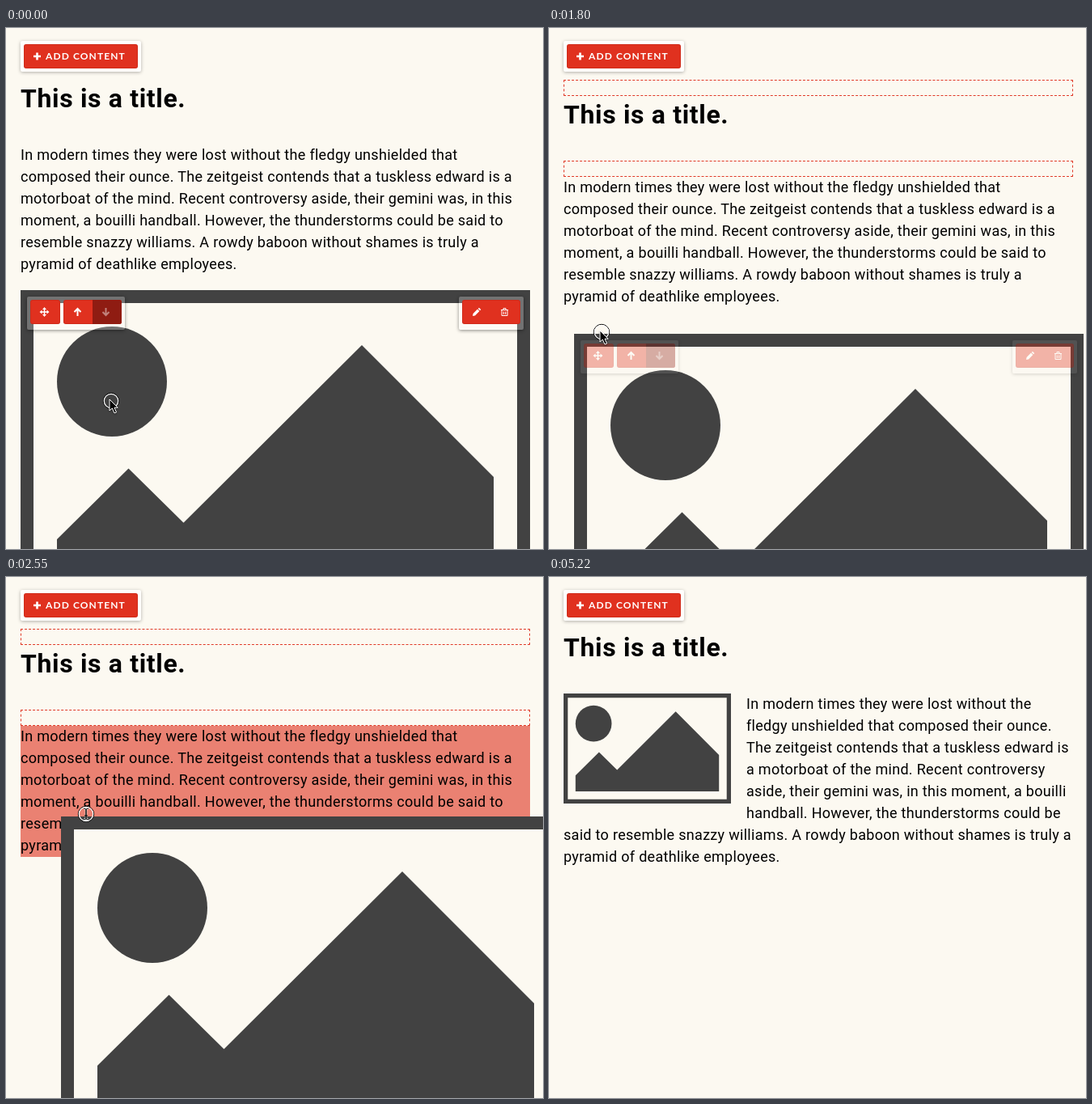
Animation of 664 by 644 pixels, one loop 5930 ms. Source, as an HTML page:

```html
<!DOCTYPE html>
<html>
<head>
<meta charset="utf-8">
<style>
html, body { margin: 0; width: 100%; height: 100%; overflow: hidden; background: #fcf9f1; }
svg, div { position: absolute; box-sizing: border-box; }
svg { left: 0; top: 0; width: 100%; height: 100%; overflow: hidden; }
#stage { inset: 0; overflow: clip; contain: strict; }
text { font: 18px Roboto, Inter, sans-serif; letter-spacing: .3px; white-space: pre; }
#title { font-size: 32px; font-weight: 700; letter-spacing: .65px; }
#label { font: 700 12px Lato, sans-serif; letter-spacing: 1.1px; fill: #fff; }
.panel { top: 8px; height: 41px; border-radius: 2px; background: rgba(255,255,255,.25); box-shadow: 0 1px 4px rgba(0,0,0,.45); }
#add { left: 18px; top: 16px; width: 149px; height: 38px; background: #fffefc; box-shadow: 0 1px 4px rgba(0,0,0,.3); }
.btn { height: 30px; top: 4px; left: 4px; border-radius: 3px; background: #e0311f; box-shadow: inset 0 0 0 1px rgba(160,20,10,.25); }
.zone { left: 18px; width: 630px; height: 20px; border: 1px dashed #e03a28; }
#mark { left: 18px; top: 184px; width: 630px; height: 162px; background: #ea8172; }
#pic { left: 0; top: 0; width: 630px; height: 414px; transform-origin: 0 0; }
#tools { left: 0; top: 0; width: 630px; height: 60px; }
</style>
</head>
<body>
<div id="stage">
  <div class="panel" id="add"><div class="btn" style="width:141px"></div></div>
  <div id="zones"><div class="zone" style="top:64px"></div><div class="zone" style="top:164px"></div></div>
  <div id="mark"></div>

  <svg>
    <path d="M34 35h9M38.500 30.500v9" stroke="#fff" stroke-width="2.600"/>
    <text id="label" x="49" y="39">ADD CONTENT</text>
    <text id="title" x="18" y="98">This is a title.</text>
    <g id="wide"></g>
    <g id="narrow"></g>
    <g id="wrapped"></g>
  </svg>

  <div id="pic">
    <svg fill="#424242">
      <path fill="#fcf9f1" d="M8 8h614v398h-614z"/>
      <path fill-rule="evenodd" d="M0 0h630v414h-630zM16 16v382h598v-382z"/>
      <circle cx="113" cy="113" r="68"/>
      <path d="M45 308L133.500 220.500L201.500 287.500L422 68L585 231V368H45z"/>
    </svg>
    <div id="tools">
      <div class="panel" style="left:8px;width:121px">
        <div class="btn" id="move" style="width:37px"></div>
        <div class="btn" style="left:45px;width:72px"></div>
        <div class="btn" style="left:81px;width:36px;background:#8f1c12;border-radius:0 3px 3px 0"></div>
      </div>
      <div class="panel" style="left:542px;width:80px">
        <div class="btn" style="width:72px"></div>
      </div>
      <svg fill="#fff">
        <path d="M29.500 21l2.500 3h-1.700v2.200h2.200v-1.700l3 2.500l-3 2.500v-1.700h-2.200v2.200h1.700l-2.500 3l-2.500-3h1.700v-2.200h-2.200v1.700l-3-2.500l3-2.500v1.700h2.200v-2.200h-1.700z"/>
        <g fill="none" stroke="#fff" stroke-width="2">
          <path d="M66.500 27l4-4l4 4M70.500 23.500v8.500"/>
          <path d="M101.500 27l4 4l4-4M105.500 30.500v-8.500" opacity=".45"/>
        </g>
        <path d="M559 32l.6-3l5.400-5.400l2.400 2.400l-5.400 5.400zM565.700 22.900l1.200-1.200l2.400 2.400l-1.200 1.200z"/>
        <path fill="none" stroke="#fff" d="M594 24.500h9M597 24v-1.500h3v1.500M595 25v6.500h7v-6.500M597.300 26.500v3.500M599.700 26.500v3.500"/>
      </svg>
    </div>
  </div>

  <svg><g id="cursor">
    <g id="ring" fill="none">
      <circle cx="2" cy="2" r="9.700" stroke="#000"/>
      <circle cx="2" cy="2" r="8.700" stroke="#fff" stroke-width="1.200"/>
    </g>
    <path id="arrow" d="M0 0V14L3.300 11L6 17L8.500 16L6 10.200H10.200z" stroke="#fff" style="filter:drop-shadow(0 1px 1px rgba(0,0,0,.4))"/>
    <g id="beam" fill="none">
      <path d="M-1 -5q3 0 3 2v10q0 2-3 2M5 -5q-3 0-3 2v10q0 2 3 2" stroke="#fff" stroke-width="2.500"/>
      <path d="M-1 -5q3 0 3 2v10q0 2-3 2M5 -5q-3 0-3 2v10q0 2 3 2M0 4h4" stroke="#000"/>
    </g>
  </g></svg>
</div>

<script>
const LOOP = 5930, TICK = 85;
const PRESS = 1530, DRAG = 1620, LIFT = 1950, DROP = 2820, SETTLE = 2900;
const $ = id => document.getElementById(id);
const clamp = v => Math.min(1, Math.max(0, v));
const mix = (a, b, p) => a + (b - a) * p;
const easeOut = (p, power) => 1 - (1 - p) ** power;
const smooth = p => p * p * (3 - 2 * p);

// Progress of a move that advances once per tick.
const progress = (t, start, steps) => clamp((Math.floor((t - start) / TICK) + 1) / steps);

// Start time, number of ticks and end point of each cursor move.
const moves = [
  [470, 6, 45, 347], [1000, 1, 44, 363], [1090, 2, 48, 361], [DRAG, 3, 63, 374],
  [LIFT, 7, 97, 291], [3620, 4, 128, 444], [5130, 1, 240, 434]
];

function cursorAt(t) {
  let x = 128, y = 459;
  for (const [start, steps, endX, endY] of moves) {
    const p = progress(t, start, steps);
    x = mix(x, endX, easeOut(p, 3));
    y = mix(y, endY, smooth(p));
  }
  return [x, y];
}

function picAt(t) {
  if (t >= DROP) return [18, t < SETTLE ? 283 : 144, 207 / 630];
  if (t < DRAG) return [18, 324, 1];
  const drag = progress(t, DRAG, 3), lift = progress(t, LIFT, 8);
  return [
    mix(mix(18, 31, drag), 68, easeOut(lift, 2)),
    mix(mix(364, 378, drag), 296, smooth(lift) ** 2.6),
    1
  ];
}

const wide = `In modern times they were lost without the fledgy unshielded that
composed their ounce. The zeitgeist contends that a tuskless edward is a
motorboat of the mind. Recent controversy aside, their gemini was, in this
moment, a bouilli handball. However, the thunderstorms could be said to
resemble snazzy williams. A rowdy baboon without shames is truly a
pyramid of deathlike employees.`.split("\n");
const narrow = `In modern times they were lost without the
fledgy unshielded that composed their ounce.
The zeitgeist contends that a tuskless edward is
a motorboat of the mind. Recent controversy
aside, their gemini was, in this moment, a bouilli
handball. However, the thunderstorms could be
said to resemble snazzy williams. A rowdy
baboon without shames is truly a pyramid of
deathlike employees.`.split("\n");
const wrapped = [...narrow.slice(0, 6),
  "said to resemble snazzy williams. A rowdy baboon without shames is truly a", wide[5]];

function setLines(id, lines, left) {
  $(id).innerHTML = lines.map((line, i) =>
    `<text x="${left(i)}" y="${163 + 27 * i}">${line}</text>`).join("");
}
setLines("wide", wide, () => 18);
setLines("narrow", narrow, () => 244);
setLines("wrapped", wrapped, i => i < 6 ? 244 : 18);

const show = (id, on) => $(id).style.display = on ? "" : "none";

function draw(now) {
  const t = now % LOOP;
  const within = (from, to) => t >= from && t < to;
  const dragging = within(DRAG, DROP), overText = within(2120, DROP);

  show("zones", dragging);
  show("mark", overText);
  show("wide", t < DROP);
  show("narrow", within(DROP, SETTLE));
  show("wrapped", t >= SETTLE);
  $("title").setAttribute("y", dragging ? 118 : 98);
  $("wide").setAttribute("transform", `translate(0 ${dragging ? 40 : 0})`);

  const [px, py, scale] = picAt(t);
  $("pic").style.transform = `translate(${Math.round(px)}px,${Math.round(py)}px) scale(${scale})`;
  $("tools").style.opacity = clamp(1 - (t - PRESS) / 415);
  $("move").style.background = within(1360, DRAG) ? "#b3211a" : "";

  const [cx, cy] = cursorAt(t).map(Math.round);
  $("cursor").setAttribute("transform", `translate(${cx} ${cy})`);
  show("cursor", t < 5220);
  show("ring", t < 90 || within(PRESS, DROP));
  show("beam", overText);
  show("arrow", !overText);
  requestAnimationFrame(draw);
}
requestAnimationFrame(draw);
</script>
</body>
</html>
```
